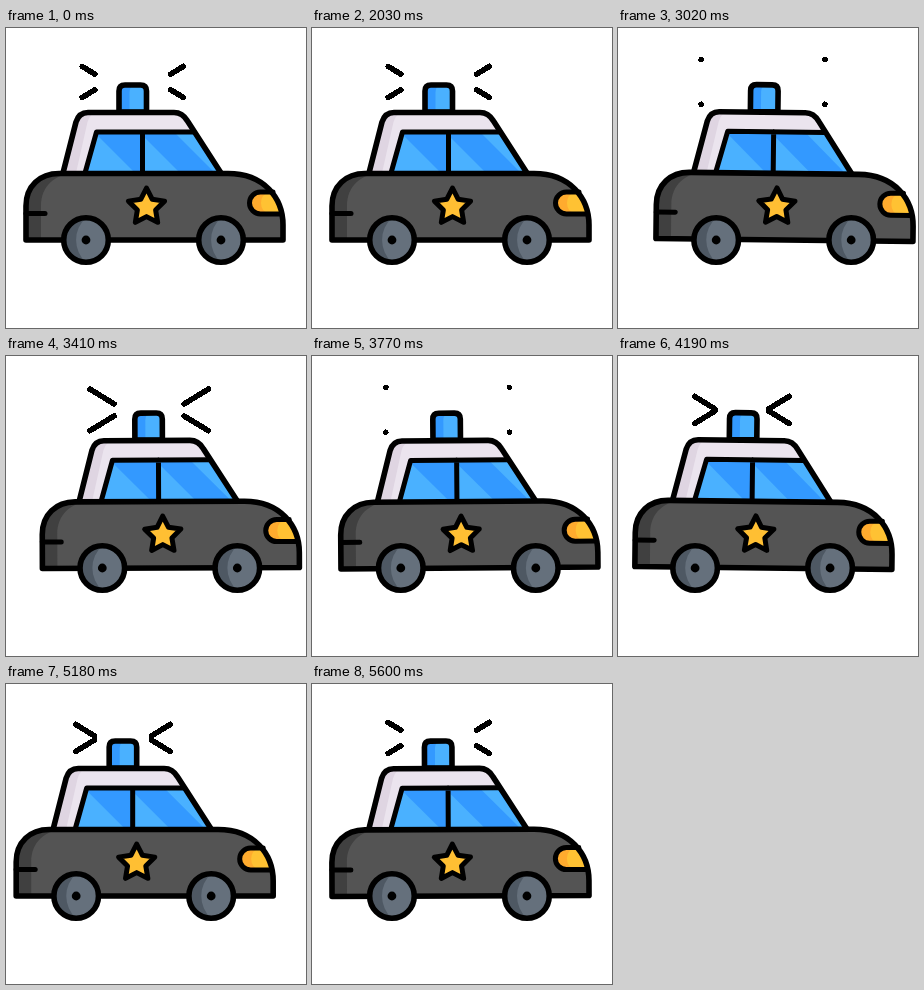
These frames come from a looping animation (300x300 px, 5.63 s). An HTML page:

```html
<!DOCTYPE html>
<html lang="en">
<head>
<meta charset="utf-8">
<title>Police car</title>
<style>
  html, body { margin: 0; width: 100%; height: 100%; overflow: hidden; background: #fff; }
  svg { display: block; width: 100vw; height: 100vh; }
  .ink { fill: none; stroke: #000; stroke-width: 5; stroke-linecap: round; stroke-linejoin: round; }
  .edge { stroke-width: 5.6; }
  #beams { shape-rendering: crispEdges; }
</style>
</head>
<body>
<svg viewBox="0 0 300 300">
  <defs>
    <clipPath id="leftPane"><path d="M90.500 104H136.500V145H79Z"/></clipPath>
    <clipPath id="rightPane"><path d="M136.500 104H188L215 145H136.500Z"/></clipPath>
    <g id="wheel">
      <circle r="22.300" fill="#65707c"/>
      <path d="M0-22.300A22.300 22.300 0 0 0 0 22.300A30 30 0 0 1 0-22.300Z" fill="#4e5863"/>
      <circle class="ink edge" r="22.300"/>
      <circle r="4.400"/>
    </g>
  </defs>
  <g id="car">
    <g id="beams" class="ink edge"></g>
    <g id="body">
      <path d="M113 84V63Q113 57 119 57H134.500Q140.500 57 140.500 63V84Z" fill="#4ab1ff"/>
      <path d="M113 84V63Q113 57 119 57H129Q123.500 58 123.500 64V84Z" fill="#3399ff"/>
      <path class="ink edge" d="M113 84V63Q113 57 119 57H134.500Q140.500 57 140.500 63V84Z"/>

      <path d="M57 145L70 94Q73 84.500 82 84.500H168Q176.500 84.500 181.500 93L215 145Z" fill="#ebe4ee"/>
      <path d="M57 145L70 94Q73 84.500 82 84.500H92Q84 85 81.500 94L70 145Z" fill="#dfd5e2"/>
      <path d="M90.500 104H188L215 145H79Z" fill="#3399ff"/>
      <path clip-path="url(#leftPane)" d="M79 104H88L129 145H79Z" fill="#4ab1ff"/>
      <path clip-path="url(#rightPane)" d="M136 107L174 145H136ZM168 104H190L231 145H209Z" fill="#4ab1ff"/>
      <path class="ink" d="M79 145L90.500 104H188M136.500 104V145"/>
      <path class="ink edge" d="M57 145L70 94Q73 84.500 82 84.500H168Q176.500 84.500 181.500 93L215 145"/>

      <path d="M20 212V178C20 158 34 145.500 53 145.500H222C258 145.500 277 170 277 197V212Z" fill="#545454"/>
      <path d="M20 212V178C20 158 34 145.500 53 145.500H68C49 146 35 158 35 178V212Z" fill="#404040"/>
      <path d="M275 186H254.500A11 11 0 0 1 254.500 164H267Q273 174 275 186Z" fill="#ffc233"/>
      <path d="M264 186H254.500A11 11 0 0 1 254.500 164H264Q255 166 255 175T264 186Z" fill="#ffab2e"/>
      <path class="ink" d="M275 186H254.500A11 11 0 0 1 254.500 164H267"/>
      <path class="ink edge" d="M20 212V178C20 158 34 145.500 53 145.500H222C258 145.500 277 170 277 197V212Z"/>
      <path class="ink" d="M20 185.500H39"/>
      <path id="star" class="ink" style="fill:#ffbf33"/>
    </g>
    <use href="#wheel" x="80" y="212"/>
    <use href="#wheel" x="215" y="212"/>
  </g>
</svg>
<script>
  const HOLD = 2030, MOVE = 3600, STEP = 30, CYCLE = 900;
  const $ = id => document.getElementById(id);
  const car = $('car'), body = $('body'), beams = $('beams');
  const mix = (a, b, p) => a + (b - a) * p;

  // Cosine ease from 0 to 1 between two times
  const ease = (t, from, to) => {
    const p = Math.min(1, Math.max(0, (t - from) / (to - from)));
    return (1 - Math.cos(Math.PI * p)) / 2;
  };

  const points = Array.from({ length: 10 }, (_, i) => {
    const r = i % 2 ? 9.6 : 19, a = Math.PI * i / 5;
    return (140.5 + r * Math.sin(a)).toFixed(2) + ' ' + (179 - r * Math.cos(a)).toFixed(2);
  });
  $('star').setAttribute('d', 'M' + points.join('L') + 'Z');

  // Each ray: inner point, then outer point
  const rays = [
    [100, 53, 65, 31.5], [100, 55, 65, 76.3],
    [153.5, 53, 188.7, 31.5], [153.5, 55, 188.7, 76.3]
  ].map(ends => {
    const el = document.createElementNS('http://www.w3.org/2000/svg', 'path');
    beams.append(el);
    return { el, ends };
  });

  const driveX = t =>
    18.5 * ease(t, 0, 1080) - 32.7 * ease(t, 1080, 2880) + 14.2 * ease(t, 2880, 3600);

  // Visible part of every ray as [tail, head]
  function trim(t) {
    const first = 1010, last = first + 2 * CYCLE;
    if (t < first) return [mix(0.32, 1, ease(t, 120, 600)), mix(0.68, 1, ease(t, 0, 400))];
    const u = (t - first) % CYCLE;
    const tail = ease(u, 225, 675), head = ease(u, 0, 450);
    return t < last ? [tail, head] : [0.32 * tail, 0.68 * head];
  }

  function draw(t) {
    const angle = 1.1 * Math.sin(2 * Math.PI * t / CYCLE);
    car.setAttribute('transform', `translate(${driveX(t).toFixed(3)} 0)`);
    body.setAttribute('transform', `rotate(${angle.toFixed(3)} 149 190)`);
    const [tail, head] = trim(t);
    for (const { el, ends: [x1, y1, x2, y2] } of rays) {
      const at = p => mix(x1, x2, p).toFixed(2) + ' ' + mix(y1, y2, p).toFixed(2);
      el.setAttribute('d', `M${at(tail)}L${at(Math.max(head, tail + 0.001))}`);
    }
  }

  const start = performance.now();
  function tick() {
    const t = (performance.now() - start) % (HOLD + MOVE) - HOLD;
    draw(Math.max(0, Math.floor(t / STEP) * STEP));
    requestAnimationFrame(tick);
  }
  tick();
</script>
</body>
</html>
```
